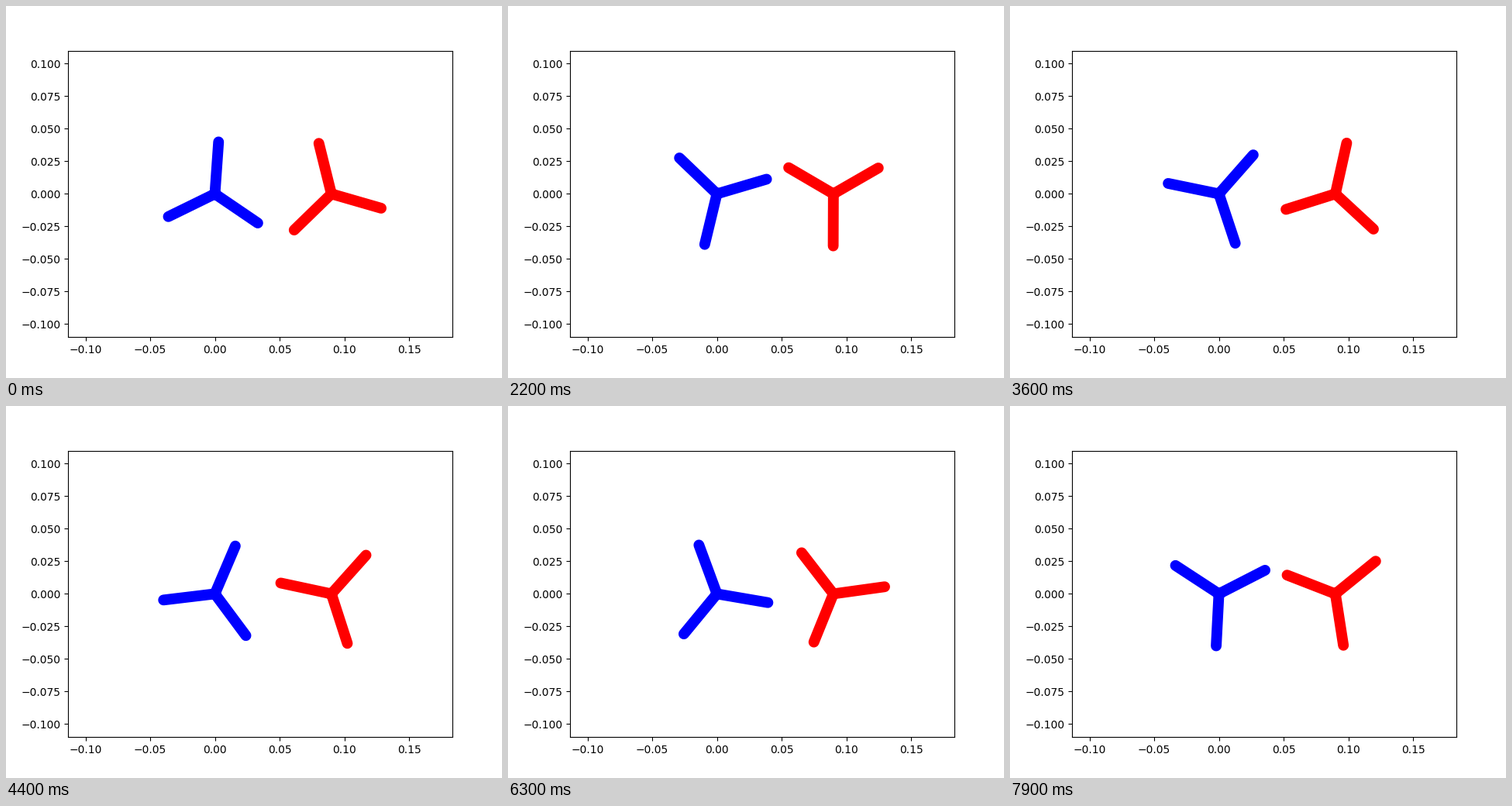
Write a matplotlib script that moves like this. It is 640 px wide and 480 px high and loops after 8 s.

```python
import numpy as np
import matplotlib.pyplot as plt
from matplotlib.animation import FuncAnimation

FRAMES = 80
INTERVAL = 100
ARM = 0.04

fig, ax = plt.subplots(figsize=(6.4, 4.8), dpi=100)
ax.set_xlim(-0.1135, 0.1835)
ax.set_ylim(-0.11, 0.11)


def spinner(color):
    return ax.plot([], [], color=color, lw=10, solid_capstyle="round")[0]


def pose(line, cx, angle):
    xs, ys = [], []
    for a in angle + np.arange(3) * 2 * np.pi / 3:
        xs += [cx, cx + ARM * np.cos(a), np.nan]
        ys += [0, ARM * np.sin(a), np.nan]
    line.set_data(xs, ys)


def driver_angle(n):
    return 1.5 + 0.04 * n


def coasting_angle(n):
    # fast spin gradually slowed by friction
    return np.radians(104 + 13.6 * n - 0.02727 * n**2 - 1.89e-5 * n**3)


blue = spinner("blue")
red = spinner("red")


def update(n):
    pose(blue, 0, driver_angle(n))
    pose(red, 0.09, coasting_angle(n))
    return blue, red


anim = FuncAnimation(fig, update, frames=FRAMES, interval=INTERVAL,
                     repeat=True, repeat_delay=0, blit=False)
plt.show()
```
